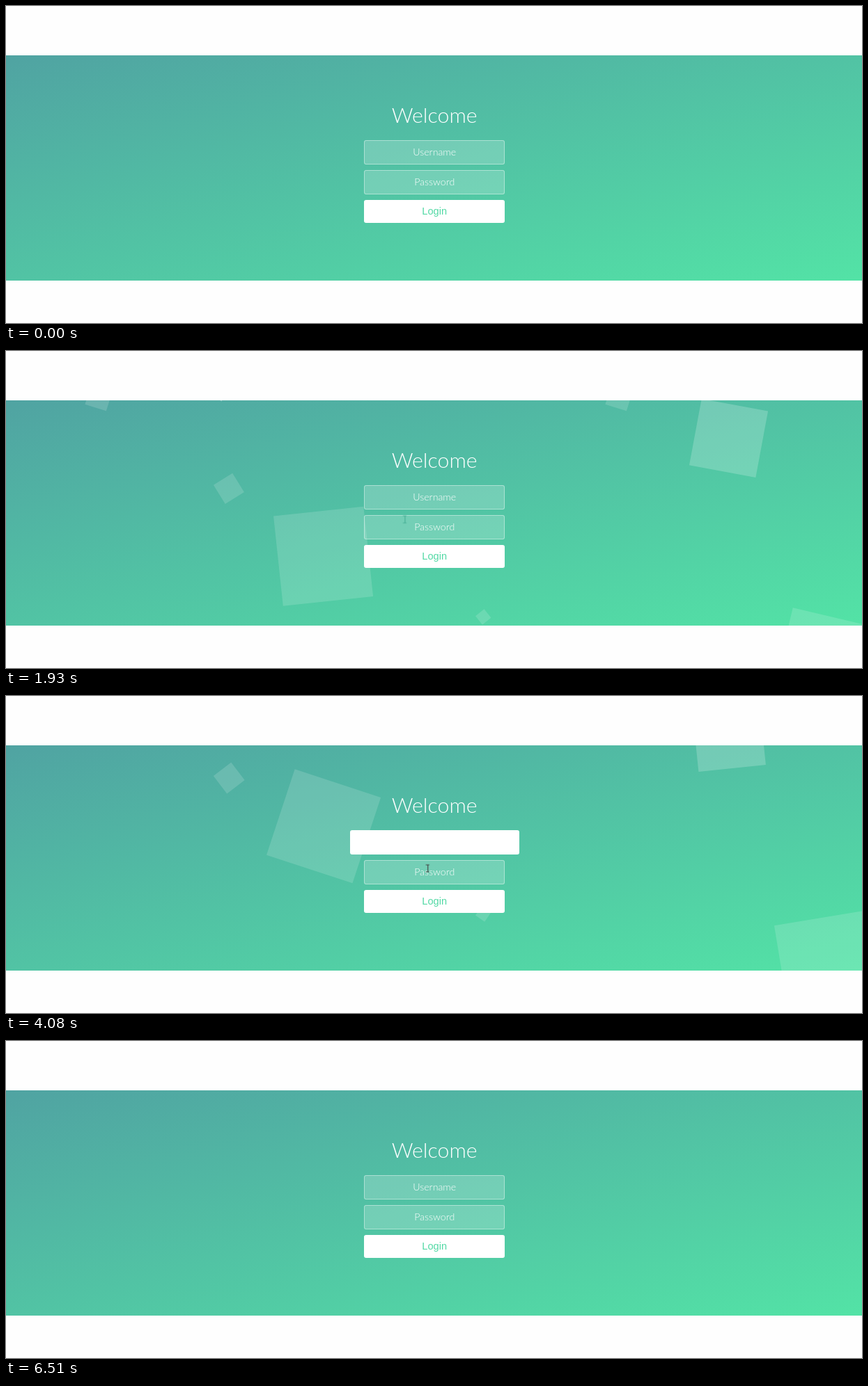
Write an HTML page that moves like this. It is 1229x456 px and loops after 7.25 s.

```html
<!DOCTYPE html>
<html lang="en">
<head>
<meta charset="utf-8">
<title>Welcome</title>
<style>
html, body { margin: 0; width: 100%; height: 100%; overflow: hidden; background: #fefefe; }
.stage { position: relative; width: 1229px; height: 456px; overflow: hidden; }
.stage * { box-sizing: border-box; }

.panel {
  position: absolute; left: -8px; top: 71px; width: 1246px; height: 324px; overflow: hidden;
  background: linear-gradient(to bottom right, #50a3a2, #53e3a6);
}
.bubbles { position: absolute; inset: 0; animation: vanish 7.25s infinite; }
.bubbles i {
  --size: 32.4px; --time: 25s; --wait: 0s; --alpha: .15;
  position: absolute; left: var(--x); bottom: -129.6px;
  width: var(--size); height: var(--size);
  background: rgb(255 255 255 / var(--alpha));
  animation: rise var(--time) ease calc(var(--wait) - 60.01s) infinite;
}
@keyframes rise { to { transform: translateY(-567px) rotate(600deg); } }
@keyframes vanish { 0%, 76.13% { opacity: 1; } 76.14%, 100% { opacity: 0; } }

.field, .button {
  position: absolute; left: 0; right: 0; margin: auto;
  width: 202.5px; border-radius: 3px;
}
.field {
  height: 35px; background: rgb(255 255 255 / .2);
  border: 1px solid rgb(255 255 255 / .4);
}
.user { top: 122px; animation: user 7.25s infinite; }
.pass { top: 165px; animation: pass 7.25s infinite; }
.button { top: 208px; height: 33px; background: #fff; }
@keyframes user {
  0%, 28.3% { width: 202.5px; background: rgb(255 255 255 / .2); }
  31%, 32.55% { width: 202.5px; background: rgb(255 255 255 / .4); animation-timing-function: ease; }
  36%, 58.62% { width: 243px; background: #fff; animation-timing-function: ease; }
  62.07%, 100% { width: 202.5px; background: rgb(255 255 255 / .2); }
}
@keyframes pass {
  0%, 58.62% { width: 202.5px; background: rgb(255 255 255 / .2); animation-timing-function: ease; }
  62.07%, 70.34% { width: 243px; background: #fff; animation-timing-function: ease; }
  73.79%, 100% { width: 202.5px; background: rgb(255 255 255 / .2); }
}

.labels { position: absolute; left: 0; top: 0; }
.labels text {
  fill: #fff; text-anchor: middle;
  font: 300 14.58px "Noto Sans CJK JP Light", Lato, sans-serif;
  font-size-adjust: .485;
}
.labels .title { font-size: 32.4px; font-size-adjust: .465; }
.labels .login { fill: #53d9a5; font: 14.58px "Liberation Sans", Arial, sans-serif; font-size-adjust: none; }

.caret { position: absolute; left: 615px; width: 1px; height: 17px; background: #a5b0ab; }
.caret.one { top: 202px; animation: caret1 7.25s step-end infinite; }
.caret.two { top: 245px; animation: caret2 7.25s step-end infinite; }
@keyframes caret1 {
  0%, 39.86%, 54.48%, 100% { opacity: 0; }
  32.55%, 47.17% { opacity: 1; }
}
@keyframes caret2 {
  0%, 65.93%, 70.34%, 100% { opacity: 0; }
  58.62% { opacity: 1; }
}

.cursor { position: absolute; left: 0; top: 0; animation: travel 7.25s linear infinite; }
.cursor svg { position: absolute; left: 0; top: 0; overflow: visible; }
.cursor path { stroke-linejoin: round; }
.arrow { animation: arrow 7.25s step-end infinite; }
.hand { animation: hand 7.25s step-end infinite; }
.beam { animation: beam 7.25s step-end infinite; }
@keyframes travel {
  0%, 4.14% { transform: translate(912px, 452px); }
  5.52% { transform: translate(832px, 408px); }
  6.21% { transform: translate(820px, 417px); }
  7.17% { transform: translate(780px, 440px); }
  8.28% { transform: translate(742px, 447px); }
  9.38% { transform: translate(697px, 438px); }
  11.03% { transform: translate(620px, 390px); }
  16.28% { transform: translate(526px, 306px); }
  17.66% { transform: translate(514px, 301px); }
  20.69% { transform: translate(530px, 290px); }
  29.66%, 34.2% { transform: translate(594px, 218px); }
  46.48% { transform: translate(597px, 226px); }
  57.24%, 63.5% { transform: translate(606px, 250px); }
  70.34%, 83.1% { transform: translate(619px, 293px); }
  85.93%, 88% { transform: translate(1033px, 415px); }
  89.79%, 100% { transform: translate(1160px, 456px); }
}
@keyframes arrow {
  0%, 16.28%, 89.79%, 100% { opacity: 0; }
  4.14%, 72% { opacity: 1; }
}
@keyframes hand {
  0%, 22%, 72%, 100% { opacity: 0; }
  16.28%, 68.5% { opacity: 1; }
}
@keyframes beam {
  0%, 68.5%, 100% { opacity: 0; stroke: #444; }
  22% { opacity: 1; stroke: #48b096; }
  36% { opacity: 1; stroke: #444; }
}
</style>
</head>
<body>
<div class="stage">
  <div class="panel">
    <div class="bubbles">
      <i style="--x:10%"></i>
      <i style="--x:20%; --size:64.8px; --wait:2s; --time:17s"></i>
      <i style="--x:25%; --wait:4s"></i>
      <i style="--x:40%; --size:48.6px; --time:22s; --alpha:.25"></i>
      <i style="--x:70%"></i>
      <i style="--x:80%; --size:97.2px; --wait:3s; --alpha:.2"></i>
      <i style="--x:32%; --size:129.6px; --wait:7s"></i>
      <i style="--x:55%; --size:16.2px; --wait:15s; --time:40s"></i>
      <i style="--x:25%; --size:8.1px; --wait:2s; --time:40s; --alpha:.3"></i>
      <i style="--x:90%; --size:129.6px; --wait:11s"></i>
    </div>
    <div class="field user"></div>
    <div class="field pass"></div>
    <div class="button"></div>
  </div>
  <svg class="labels" width="1229" height="456">
    <text class="title" x="615.2" y="168">Welcome</text>
    <text x="615.2" y="215">Username</text>
    <text x="615.2" y="258">Password</text>
    <text class="login" x="615.2" y="300">Login</text>
  </svg>
  <div class="caret one"></div>
  <div class="caret two"></div>
  <div class="cursor">
    <svg class="arrow" width="12" height="17"><path d="M.4 .4V12.6L3.2 10 5 14.4 6.9 13.6 5.1 9.4H9z" fill="#fff" stroke="#222" stroke-width=".8"/></svg>
    <svg class="hand" width="12" height="17"><path transform="translate(-2)" d="M2.4 9V1.6a1.2 1.2 0 0 1 2.4 0V6l4.6 1q1.4 .4 1.4 1.8v2.6q0 1.8-1 3.2v1.2H4.2v-1.2Q2.6 12.6 .8 10.4 -.2 8.2 2.4 9z" fill="#fff" stroke="#222" stroke-width=".9"/></svg>
    <svg class="beam" width="8" height="12"><path d="M-2.5 -5H2.5M.5 -5V5M-2.5 5H2.5" fill="none" stroke-width="1.2"/></svg>
  </div>
</div>
<script>
const LOOP = 7250;
const start = performance.now();
const anims = document.getAnimations();
anims.forEach(a => a.pause());

function draw() {
  const t = (performance.now() - start) % LOOP;
  // The squares start slightly late and catch up.
  const lag = 90 * Math.max(0, 1 - t / 1280);
  for (const a of anims) a.currentTime = a.animationName === "rise" ? t - lag : t;
  requestAnimationFrame(draw);
}
draw();
</script>
</body>
</html>
```
